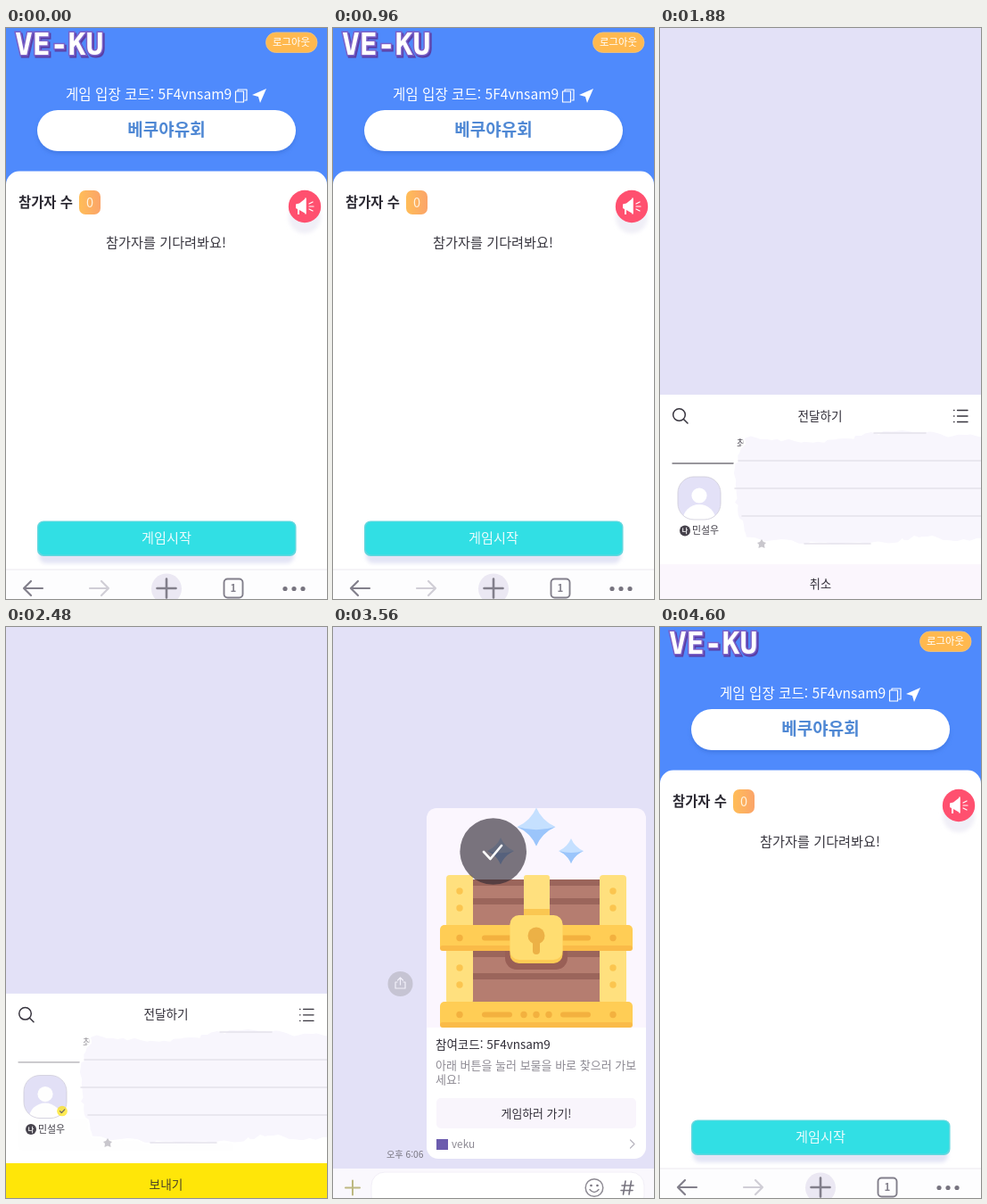
An HTML page for the animation above (4640 ms loop, 360 by 640 pixels).

```html
<!DOCTYPE html>
<html lang="ko">
<head>
<meta charset="utf-8">
<style>
  html, body { margin: 0; width: 100%; height: 100%; overflow: hidden; background: #e3e1f7; }
  svg { display: block; width: 360px; height: 640px; }
  text { font-family: "Noto Sans CJK KR", "Noto Sans CJK", "Noto Sans", sans-serif; }
  .logo { font: bold 33px "DejaVu Sans Mono", monospace; }
  .line { fill: none; stroke-linecap: round; stroke-linejoin: round; }
</style>
</head>
<body>
<svg id="stage" viewBox="0 0 360 640"></svg>
<script>
const LOOP = 4640, SHARE = 1160, PICK = 2480, CHAT = 2880, BACK = 3600;

// Text placed by its vertical centre.
const text = (str, x, cy, size, fill, extra = '') =>
  `<text x="${x}" y="${cy + size * .37}" font-size="${size}" fill="${fill}" ${extra}>${str}</text>`;
const centred = (str, x, cy, size, fill, extra = '') =>
  text(str, x, cy, size, fill, 'text-anchor="middle" ' + extra);
const box = (x, y, w, h, r, fill, extra = '') =>
  `<rect x="${x}" y="${y}" width="${w}" height="${h}" rx="${r}" fill="${fill}" ${extra}/>`;
const disc = (x, y, r, fill, extra = '') =>
  `<circle cx="${x}" cy="${y}" r="${r}" fill="${fill}" ${extra}/>`;
const line = (d, stroke, width = 1.5, extra = '') =>
  `<path class="line" d="${d}" stroke="${stroke}" stroke-width="${width}" ${extra}/>`;
const shape = (d, fill) => `<path d="${d}" fill="${fill}"/>`;

function lobby() {
  const logo = (dx, dy, fill, stroke) =>
    `<text class="logo" x="${10 + dx}" y="${30 + dy}" fill="${fill}" stroke="${stroke}" stroke-width="3" paint-order="stroke">VE-KU</text>`;
  return box(0, 0, 360, 640, 0, '#4f8afc')
    + logo(1.5, 2, '#5a3fa6', '#5a3fa6') + logo(0, 0, '#fff', '#7c62c8')
    + box(291.5, 5, 57.5, 22.5, 11.2, '#ffb94f', 'stroke="#f2c583" stroke-width=".8"')
    + centred('로그아웃', 320, 15.5, 11.4, '#fff')
    + text('게임 입장 코드: 5F4vnsam9', 67, 74.5, 15.6, '#fff')
    + line('M260 70V69H270V81H268M257.500 71H266.500V83H257.500Z', '#fff', 1.2)
    + shape('M292 68L276 75L283 77L285 84Z', '#fff')
    + box(35, 95, 290, 46, 23, '#3b6fd8', 'opacity=".55" filter="url(#soft)"')
    + box(35, 92, 290, 46, 23, '#fff')
    + centred('베쿠야유회', 180, 113.5, 19, '#4f88d4', 'font-weight="700"')
    + box(0, 160.5, 360, 520, 15, '#fff')
    + text('참가자 수', 14, 195, 15.4, '#2c2a33', 'font-weight="700"')
    + box(82, 182, 24, 27, 7, 'url(#amber)') + centred('0', 94, 195.5, 14.5, '#fff3df', 'font-weight="500"')
    + disc(335, 212, 18, '#f0eff7', 'filter="url(#soft)"') + disc(335, 200, 18.2, '#ff506f')
    + shape('M325 197.500L329 196.500L336 191V208L329 204V209H327V203L325 202Z', '#fff')
    + line('M336 191V208', '#fff', 1.5)
    + line('M340 197L344 195M340 200H345M340 203L344 205', '#fff', 1.2)
    + centred('참가자를 기다려봐요!', 179.5, 240.5, 15.2, '#3a3841')
    + box(37, 560, 286, 40, 8, '#e3e4f5', 'filter="url(#soft)"')
    + box(35, 552.5, 290.500, 39.5, 7, '#62d7de') + box(36.500, 553.5, 287.500, 37, 6.5, '#31dfe4')
    + centred('게임시작', 180, 571, 15.2, '#eafcfd')
    + box(0, 607, 360, 33, 0, '#fdfdfe') + box(0, 606.5, 360, 1, 0, '#ebeaf0')
    + line('M41 628H20M28 620L20 628L28 636', '#827f8b', 2.2)
    + line('M94 628H115M107 620L115 628L107 636', '#d0ced6', 2.2)
    + disc(180, 628.5, 17, '#ebe8f3') + line('M169.500 628H190.500M180 617.500V638.500', '#827f8b', 2.6)
    + box(244.500, 617.500, 21, 21, 4, 'none', 'stroke="#827f8b" stroke-width="1.900"')
    + centred('1', 255, 628, 11.5, '#827f8b', 'font-weight="700"')
    + [313, 323, 333].map(x => disc(x, 628.5, 2.6, '#77747f')).join('');
}

// Torn paper outline: a few corners, roughened with seeded noise.
function tornPath() {
  let seed = 7;
  const jitter = () => ((seed = seed * 16807 % 2147483647) / 2147483647 - .5) * 4.5;
  const corners = [[97, 458], [130, 462], [170, 464], [207, 461], [235, 455], [265, 452], [300, 453],
    [330, 458], [366, 456], [366, 573], [330, 573], [295, 569], [265, 575], [200, 578], [155, 576],
    [97, 572], [89, 545], [83, 516], [87, 485], [97, 458]];
  const points = [];
  for (let i = 0; i + 1 < corners.length; i++) {
    const [ax, ay] = corners[i], [bx, by] = corners[i + 1];
    for (let k = 0; k < 6; k++)
      points.push([ax + (bx - ax) * k / 6 + jitter(), ay + (by - ay) * k / 6 + jitter()]);
  }
  return 'M' + points.map(p => p.map(v => v.toFixed(1))).join('L') + 'Z';
}

function avatar(x, y) {
  return `<g transform="translate(${x} ${y})" clip-path="url(#squircle)">`
    + box(-24, -24, 48, 48, 18, '#e3e1f7') + disc(0, -3, 8.6, '#fff')
    + '<ellipse cy="25" rx="18.500" ry="18" fill="#fff"/></g>'
    + box(x - 24, y - 24, 48, 48, 18, 'none', 'stroke="#cdcbd8" stroke-width=".8"');
}

function share() {
  return `<g id="sheet">` + box(0, 411, 360, 240, 0, '#fff') + '</g>'
    + '<g id="list">'
    + avatar(44, 527) + avatar(115, 527) + avatar(184, 527)
    + box(20, 503, 48, 48, 18, '#3f3745', 'id="shade"')
    + '<g id="badge">' + disc(0, 0, 8.3, '#ffe30c') + line('M-3.500 0L-1 2.800L4 -2.500', '#40392c', 1.6) + '</g>'
    + disc(28, 563.5, 6, '#45414b') + centred('나', 28, 563.5, 7, '#fff', 'font-weight="700"')
    + text('민설우', 36, 563, 10.9, '#3a3740') + '</g>'
    + '<g id="tabs">' + text('최근', 86, 466, 11, '#55515c')
    + line('M14 488H84', '#77747c', 1.3) + '</g>'
    + '<g id="header">' + disc(21.500, 433.5, 6.8, 'none', 'stroke="#37343e" stroke-width="1.500"')
    + line('M26.500 438.500L31 443', '#37343e')
    + centred('전달하기', 179.5, 434.5, 13.6, '#302d37')
    + line('M333.500 428.500H345M333.500 435H345M333.500 441.500H345M329.500 428.500H330M329.500 435H330M329.500 441.500H330', '#37343e', 1.3)
    + '</g>'
    + '<g id="field">' + box(14, 551, 332, 36, 4, '#f9f5fd')
    + text('메시지를 입력하세요', 27, 569.5, 11.8, '#bdb9c2') + '</g>'
    + `<path d="${tornPath()}" fill="#f8f6fd" stroke="#fff" stroke-width="4" paint-order="stroke" stroke-linejoin="round"/>`
    + line('M240 454H298M88 485H360M84 516H360M92 547H360M162 578H236', '#e5e2eb', 1.6)
    + shape('M109 577L112 576L114 573L116 576L119 577L117 579L117.500 583L114 581.500L110.500 583L111 579Z', '#c9c7cd')
    + '<g id="cancel">' + box(-2, 601, 364, 39, 0, '#fbf6fd') + centred('취소', 180, 623, 13.2, '#302d37') + '</g>'
    + '<g id="send">' + box(0, 601, 360, 39, 0, '#ffe608') + centred('보내기', 179.5, 625, 13.7, '#4b4228') + '</g>';
}

function sparkle(x, y, r) {
  const k = r * .3;
  return shape(`M${x} ${y - r}Q${x + k} ${y - k} ${x + r} ${y}Q${x + k} ${y + k} ${x} ${y + r}Q${x - k} ${y + k} ${x - r} ${y}Q${x - k} ${y - k} ${x} ${y - r}Z`, '#c5e0ff')
    + shape(`M${x + r} ${y}Q${x + k} ${y + k} ${x} ${y + r}Q${x - k} ${y + k} ${x - r} ${y}Q${x} ${y + k} ${x + r} ${y}Z`, '#9bc5fb');
}

function chest() {
  const band = y => box(120, y, 216, 29, 5, '#ffcd55') + box(120, y + 23, 216, 6, 3, '#fabb48')
    + box(167, y + 11.5, 34, 6, 3, '#f3b13f') + box(255, y + 11.5, 34, 6, 3, '#f3b13f')
    + disc(142, y + 14.5, 3.7, '#f3b13f') + disc(314, y + 14.5, 3.7, '#f3b13f');
  const pillar = x => box(x, 278, 30, 144, 4, '#ffe07e')
    + [296, 315, 382, 401].map(y => disc(x + 15, y, 3.7, '#fbc54f')).join('');
  return box(153, 283, 150, 138, 0, '#b57d70')
    + [283, 304, 363, 388].map(y => box(153, y, 150, 7, 0, '#9b655b')).join('')
    + box(193, 340, 70, 44, 13, '#995f56')
    + pillar(127) + pillar(299)
    + box(214, 278, 29, 60, 3, '#ffe07e') + box(214, 316, 29, 18, 0, '#fac751')
    + band(334) + band(420)
    + [214, 228, 242].map(x => disc(x, 434.5, 3.7, '#f3b13f')).join('')
    + box(198.500, 324, 59, 53, 10, '#fdcb54') + box(198.500, 323, 59, 50, 10, '#ffdd71')
    + disc(228, 346, 9.5, '#ecb146') + box(224, 350, 8, 17, 4, '#ecb146');
}

function chat() {
  return box(0, 0, 360, 640, 0, '#e3e1f7')
    + box(105, 203, 246, 393, 13, '#fff')
    + shape('M105 449V216Q105 203 118 203H338Q351 203 351 216V449Z', '#fbf6fe')
    + sparkle(228, 224, 21.5) + sparkle(188, 251, 15) + sparkle(267, 251, 14) + chest()
    + text('참여코드: 5F4vnsam9', 115, 468, 13.5, '#302d37')
    + text('아래 버튼을 눌러 보물을 바로 찾으러 가보', 115, 491, 13, '#8d8a93')
    + text('세요!', 115, 507, 13, '#8d8a93')
    + box(116, 528, 224, 34, 5, '#f9f5fc')
    + centred('게임하러 가기!', 228, 545, 12.9, '#302d37', 'font-weight="500"')
    + box(116, 574, 13, 12, 0, '#6c5cae') + text('veku', 133, 579.5, 11.8, '#8d8a93')
    + line('M333.500 575L338 579.500L333.500 584', '#b9b6c0', 1.2)
    + disc(75.500, 400, 14, '#c6c4d3')
    + line('M72 398H70V405H81V398H79M75.500 401V393M72.500 396L75.500 393L78.500 396', '#f2f0fa', 1.2)
    + text('오후 6:06', 60, 591.5, 10.2, '#77747f')
    + box(0, 607, 360, 33, 0, '#faf8fd') + box(43, 611, 306, 42, 15, '#fff', 'stroke="#f2eff7"')
    + line('M14 628.500H30M22 620.500V636.500', '#bdb881', 2)
    + disc(293, 628.5, 9.8, 'none', 'stroke="#8d8a93" stroke-width="1.500"')
    + disc(289.500, 626, 1.3, '#77747f') + disc(296.500, 626, 1.3, '#77747f')
    + line('M288 630.500Q293 636.500 298 630.500', '#8d8a93')
    + line('M328 621L325.500 636M334.500 621L332 636M324 626H337M323 631.500H336', '#77747f', 1.6)
    + '<g id="toast">' + disc(179.700, 251.5, 37.3, '#2f2933', 'opacity=".63"')
    + line('M169 252L176.500 260L189 245', '#fff', 2.6) + '</g>';
}

const $ = id => document.getElementById(id);
$('stage').innerHTML = `<defs>
  <filter id="soft" x="-20%" y="-40%" width="140%" height="180%"><feGaussianBlur stdDeviation="2"/></filter>
  <linearGradient id="amber"><stop stop-color="#ffbd58"/><stop offset="1" stop-color="#fba469"/></linearGradient>
  <clipPath id="squircle"><rect x="-24" y="-24" width="48" height="48" rx="18"/></clipPath></defs>
  <g id="lobby">${lobby()}</g>
  <g id="share">${box(0, 0, 360, 640, 0, '#e3e1f7')}${share()}</g>
  <g id="chat">${chat()}</g>`;

const clamp = v => Math.max(0, Math.min(1, v));
const easeOut = v => 1 - (1 - clamp(v)) ** 3;
const show = (id, on) => $(id).style.display = on ? '' : 'none';
const move = (id, x, y, scale = 1) => $(id).setAttribute('transform', `translate(${x} ${y}) scale(${scale})`);
const fade = (id, opacity) => $(id).setAttribute('opacity', opacity);

function render(t) {
  show('lobby', t < SHARE || t >= BACK);
  show('share', t >= SHARE && t < CHAT);
  show('chat', t >= CHAT && t < BACK);

  const slide = 1.2 * (1 - easeOut((t - SHARE) / 360));
  const picked = easeOut((t - PICK) / 320);
  move('sheet', slide, -9 * picked);
  move('header', slide, -21 * picked);
  move('list', slide, -50 * picked);
  move('tabs', slide, -21 * picked);
  move('cancel', slide, 0);
  fade('tabs', t < PICK ? 1 : .6 * (1 - picked));
  fade('field', picked);
  fade('shade', .37 * picked);
  move('badge', 63, 543, .7 + .3 * picked);
  fade('badge', t < PICK ? 0 : .7 + .3 * picked);
  show('cancel', t < PICK);
  show('send', t >= PICK);
  fade('toast', clamp((t - CHAT + 40) / 120));
}

const start = performance.now();
(function tick() {
  render((performance.now() - start) % LOOP);
  requestAnimationFrame(tick);
})();
</script>
</body>
</html>
```
